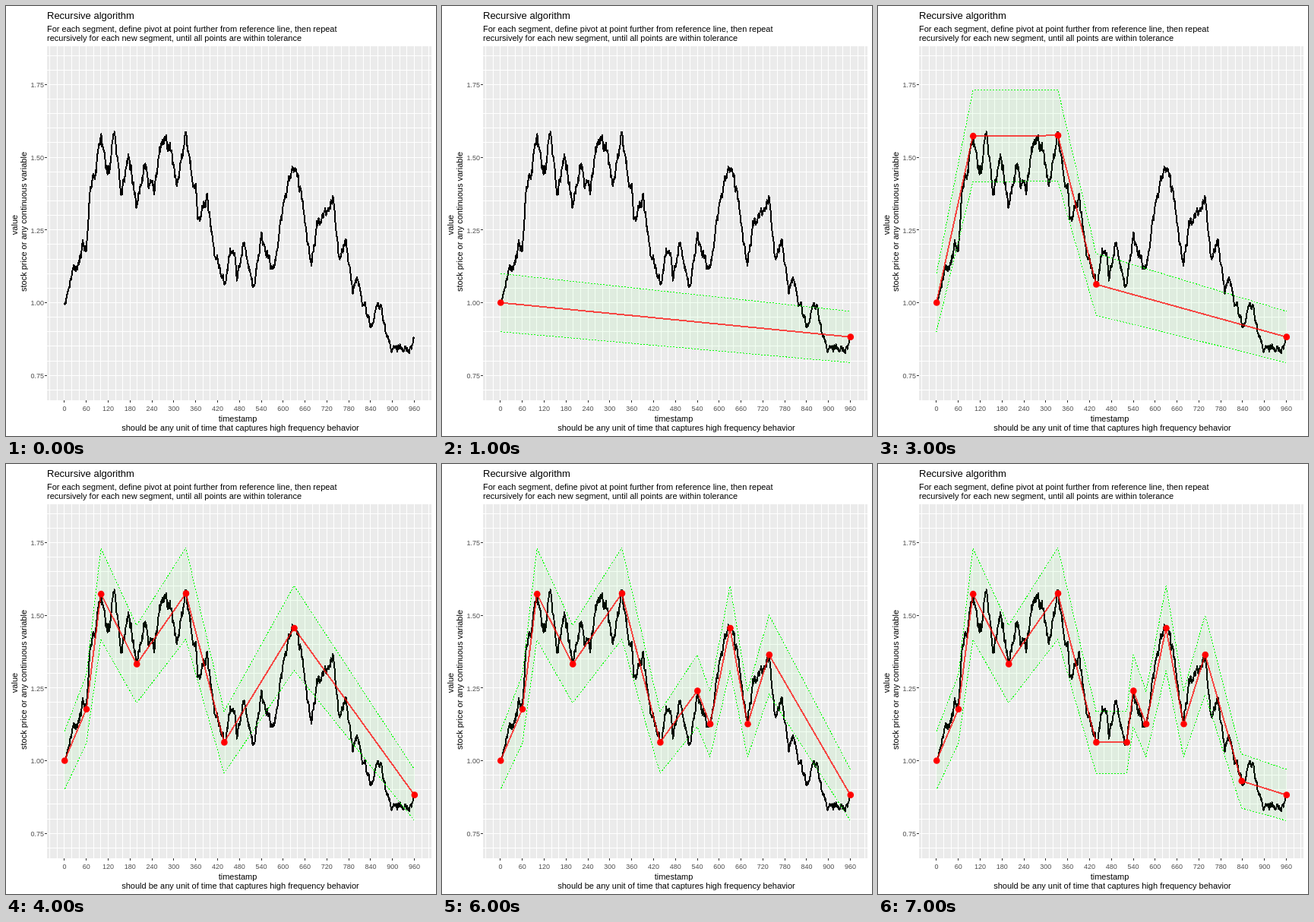
Write an HTML page that moves like this. It is 566 by 566 pixels and loops after 8000 ms.

```html
<!DOCTYPE html>
<html lang="en">
<head>
<meta charset="utf-8">
<title>Recursive algorithm</title>
<style>
  html, body { margin: 0; width: 100%; height: 100%; overflow: hidden; background: #fff; }
  svg { display: block; width: 566px; height: 566px; font: 11px "Liberation Sans", Arial, sans-serif; }
  .title { font-size: 13px; }
  .tick { font-size: 9px; fill: #4d4d4d; }
  .mid { text-anchor: middle; }
  .end { text-anchor: end; }
  path { fill: none; shape-rendering: crispEdges; }
  #grid { stroke: #fff; }
  #ticks { stroke: #333; }
  #series { stroke: #000; stroke-width: 2; stroke-linejoin: round; }
  #band { fill: #0f0; fill-opacity: .05; }
  #upper, #lower { stroke: #0f0; stroke-dasharray: 2 2; }
  #fit { stroke: #f00; stroke-opacity: .7; stroke-width: 2; stroke-linejoin: round; }
  #dots { fill: #f00; }
</style>
</head>
<body>
<svg viewBox="0 0 566 566">
  <rect x="54" y="53" width="506" height="466" fill="#ebebeb"/>
  <path id="grid"/>
  <path id="ticks"/>
  <g id="labels"></g>
  <text class="title" x="54" y="17">Recursive algorithm</text>
  <text x="54" y="34">For each segment, define pivot at point further from reference line, then repeat</text>
  <text x="54" y="46">recursively for each new segment, until all points are within tolerance</text>
  <text class="mid" x="305" y="547">timestamp</text>
  <text class="mid" x="308.5" y="559">should be any unit of time that captures high frequency behavior</text>
  <text class="mid" transform="translate(15 288) rotate(-90)">value</text>
  <text class="mid" transform="translate(27 284) rotate(-90)">stock price or any continuous variable</text>
  <path id="series"/>
  <path id="band"/>
  <path id="upper"/>
  <path id="lower"/>
  <path id="fit"/>
  <g id="dots"></g>
</svg>
<script>
const STEP = 1000, STEPS = 8, TOLERANCE = 0.1;

// Turning points of the series: time, value.
const turns = [
  [0, 1], [25, 1.12], [50, 1.216], [60, 1.177], [78, 1.44], [100, 1.573], [118, 1.44],
  [137, 1.588], [156, 1.375], [176, 1.5], [198, 1.332], [221, 1.475], [248, 1.384],
  [262, 1.535], [290, 1.55], [308, 1.4], [333, 1.575], [369, 1.295], [391, 1.376],
  [408, 1.2], [438, 1.063], [455, 1.187], [474, 1.08], [493, 1.207], [522, 1.063],
  [540, 1.24], [575, 1.126], [595, 1.29], [630, 1.456], [678, 1.126], [692, 1.27],
  [737, 1.364], [751, 1.17], [773, 1.215], [791, 1.03], [805, 1.08], [837, 0.93],
  [868, 0.994], [888, 0.878], [948, 0.848], [960, 0.882]
];

const $ = id => document.getElementById(id);
const px = t => 76.95 + t * 0.47975;
const py = v => 773.25 - v * 382.76;
const snap = n => Math.floor(n) + 0.5;
const setPath = (id, d) => $(id).setAttribute('d', d);
const line = pts => pts.length
  ? 'M' + pts.map(([t, v]) => `${px(t).toFixed(2)} ${py(v).toFixed(2)}`).join('L')
  : '';
const valueAt = (t, [t0, v0], [t1, v1]) => v0 + (v1 - v0) * (t - t0) / (t1 - t0);

function drawAxes() {
  let grid = '', ticks = '', labels = '';
  for (let t = -40; t <= 1000; t += 20) grid += `M${snap(px(t))} 53V519`;
  for (let i = 14; i <= 37; i++) grid += `M54 ${snap(py(i / 20))}H560`;
  for (let t = 0; t <= 960; t += 60) {
    ticks += `M${snap(px(t))} 519v3`;
    labels += `<text class="tick mid" x="${px(t)}" y="533">${t}</text>`;
  }
  for (let v = 0.75; v < 2; v += 0.25) {
    ticks += `M51 ${snap(py(v))}h3`;
    labels += `<text class="tick end" x="50" y="${Math.round(py(v)) + 4}">${v.toFixed(2)}</text>`;
  }
  setPath('grid', grid);
  setPath('ticks', ticks);
  $('labels').innerHTML = labels;
}

// A seeded random walk, pinned to both turning points of each stretch.
function drawSeries() {
  let seed = 11;
  const rand = () => (seed = seed * 16807 % 2147483647) / 2147483647 - 0.5;
  const pts = [turns[0]];
  for (let i = 1; i < turns.length; i++) {
    const a = turns[i - 1], b = turns[i], n = b[0] - a[0];
    const walk = [0];
    for (let k = 1; k <= n; k++) walk.push(walk[k - 1] + rand() * 0.026);
    for (let k = 1; k <= n; k++) {
      const t = a[0] + k;
      pts.push([t, valueAt(t, a, b) * (1 + walk[k] - walk[n] * k / n)]);
    }
  }
  setPath('series', line(pts));
}

// Splits a segment at its relatively furthest point; the depth is the step it appears in.
function split(lo, hi, depth) {
  let best = lo, far = TOLERANCE;
  for (let i = lo + 1; i < hi; i++) {
    const [t, v] = turns[i];
    const gap = Math.abs(v / valueAt(t, turns[lo], turns[hi]) - 1);
    if (gap > far) [best, far] = [i, gap];
  }
  if (best === lo) return [];
  return [
    ...split(lo, best, depth + 1),
    { point: turns[best], depth },
    ...split(best, hi, depth + 1)
  ];
}

const last = turns.length - 1;
const pivots = [
  { point: turns[0], depth: 1 },
  ...split(0, last, 2),
  { point: turns[last], depth: 1 }
];

function drawStep(step) {
  const pts = pivots.filter(p => p.depth <= step).map(p => p.point);
  const scaled = k => pts.map(([t, v]) => [t, v * k]);
  const top = scaled(1 + TOLERANCE);
  const bottom = scaled(1 - TOLERANCE).reverse();
  setPath('band', line([...top, ...bottom]));
  setPath('upper', line(top));
  setPath('lower', line(bottom));
  setPath('fit', line(pts));
  $('dots').innerHTML = pts
    .map(([t, v]) => `<circle cx="${px(t) + 0.3}" cy="${py(v)}" r="4.3"/>`)
    .join('');
}

drawAxes();
drawSeries();

const start = performance.now();
let shown = -1;
function tick() {
  const step = Math.floor((performance.now() - start) / STEP) % STEPS;
  if (step !== shown) drawStep(shown = step);
  requestAnimationFrame(tick);
}
tick();
</script>
</body>
</html>
```
